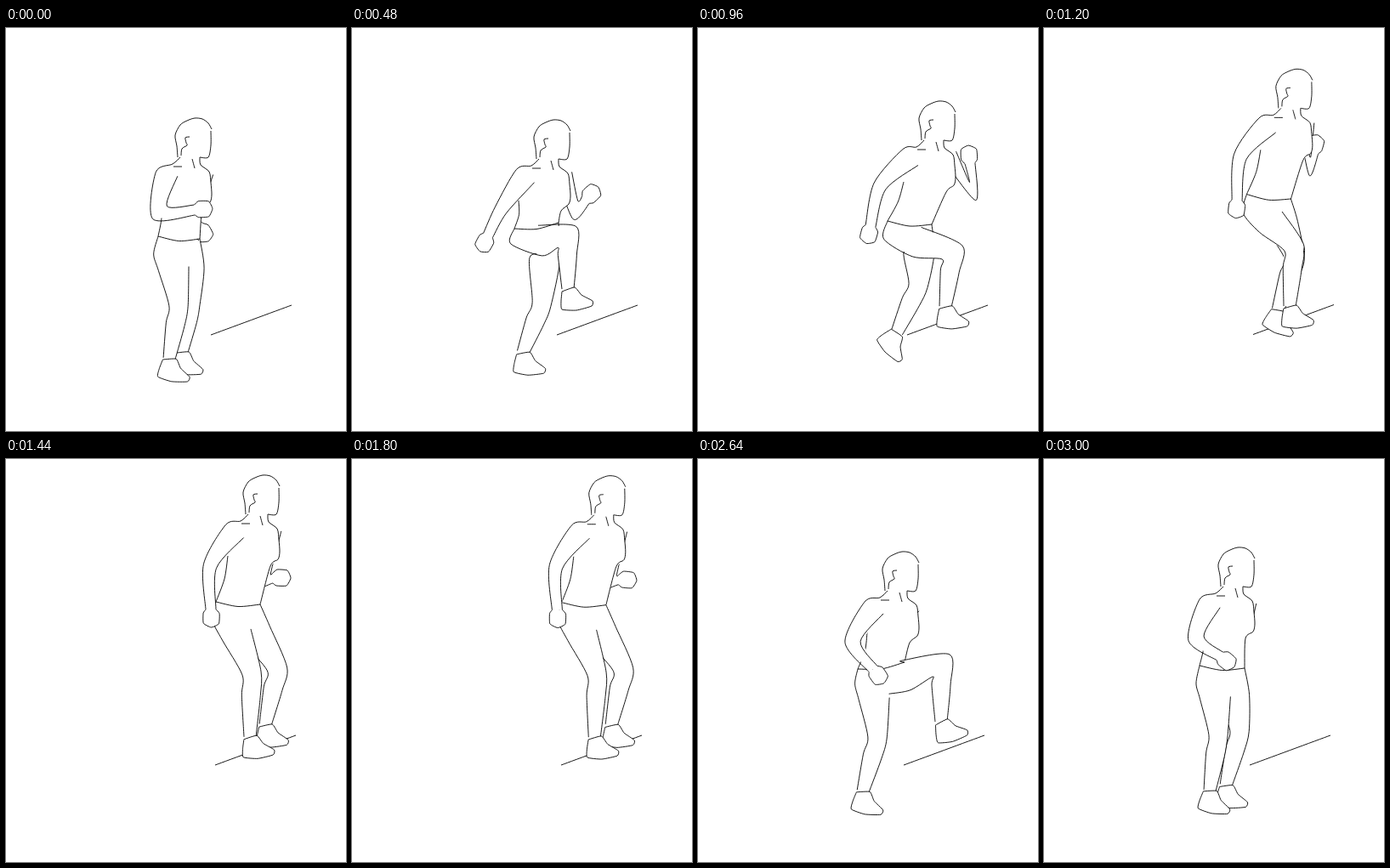
Write an HTML page with a canvas that moves like this. It is 400 px wide and 474 px high and loops after 3.12 s.

```html
<!DOCTYPE html>
<html lang="en">
<head>
<meta charset="utf-8">
<title>Step-up exercise</title>
<style>
html, body { margin: 0; width: 400px; height: 474px; overflow: hidden; background: #fff; }
canvas { display: block; }
</style>
</head>
<body>
<canvas id="stage" width="400" height="474"></canvas>
<script>
const ctx = document.getElementById('stage').getContext('2d');
const LOOP = 3120, STEP = 120;
// Key times; the upright pose on the step is held between two of them.
const times = [0, 480, 960, 1440, 1760, 2160, 2640, 3000];
const poseAt = [0, 1, 2, 3, 3, 4, 5, 6];
const KEYS = times.length;

const points = text => text.split(', ').map(pair => pair.split(' ').map(Number));

// Joint positions, one per pose.
const joints = {
  head: points('222 106, 237 108, 283 86, 302 19, 288 59, 240 109, 228 104'),
  elbow: points('181 217, 175 214, 214 186, 240 126, 232 169, 182 215, 179 211'),
  wrist: points('222 214, 160 244, 203 233, 241 177, 254 206, 206 247, 207 232'),
  farElbow: points('220 222, 263 214, 323 192, 303 140, 294 186, 235 195, 235 195'),
  farWrist: points('227 233, 275 202, 320 159, 314 140, 311 207, 222 213, 222 211'),
  hipBack: points('179 245, 191 236, 223 227, 247 168, 228 205, 188 247, 183 243'),
  hipFront: points('228 248, 243 229, 275 231, 299 171, 289 206, 243 239, 236 246'),
  knee: points('203 327, 253 246, 299 264, 289 252, 244 297, 211 328, 205 325'),
  ankle: points('192 389, 254 307, 291 328, 287 327, 216 353, 194 391, 195 390'),
  farKnee: points('217 325, 223 325, 259 303, 319 247, 320 260, 286 243, 230 320'),
  farAnkle: points('207 381, 201 382, 234 358, 305 313, 308 325, 286 309, 214 384'),
  // Tilt of the near and the far foot in degrees.
  tilt: points('16 14, 0 9, 6 53, 2 7, 54 5, 17 -8, 17 12'),
  ground: points('241 361, 241 361, 246 361, 246 360, 247 360, 242 360, 242 360')
};

// Strokes that move with the head, measured from the top of the skull.
const headStrokes = [
  '-20 46, -21 33, -23 20, -17 8, -9 3, 0 0, 9 1, 16 6, 20 13',
  '19 15, 19 32, 16 46, 6 46',
  '-6 22, -11 23, -10 29, -9 32, -15 36, -16 44',
  '-3 48, 0 59',
  '-25 57, -15 57'
].map(points);
const chestShape = points('6 46, 7 55, 17 63, 19 76, 20 90, 18 99, 9 107');
const shoeShape = points('-7 3, 8 -2, 16 7, 29 14, 28 20, 10 25, -7 24, -8 14');
const fistShape = points('0 -6, 5 -10, 17 -9, 21 0, 16 9, 4 9, 0 6');

const add = (p, x, y) => [p[0] + x, p[1] + y];
const mix = (p, q, k) => p.map((v, i) => v + (q[i] - v) * k);
const angle = (p, q) => Math.atan2(q[1] - p[1], q[0] - p[0]);
const place = (shape, [x, y], turn = 0) => {
  const c = Math.cos(turn), s = Math.sin(turn);
  return shape.map(([u, v]) => [x + u * c - v * s, y + u * s + v * c]);
};

const wrap = k => (k + KEYS) % KEYS;
const span = k => wrap(k) < KEYS - 1 ? times[wrap(k) + 1] - times[wrap(k)] : LOOP - times[KEYS - 1];

// Monotone cubic interpolation around the loop.
function tween(rows, t) {
  let k = KEYS - 1;
  while (times[k] > t) k--;
  const u = (t - times[k]) / span(k);
  return rows[0].map((_, i) => {
    const value = j => rows[poseAt[wrap(j)]][i];
    const slope = j => (value(j + 1) - value(j)) / span(j);
    const tangent = j => {
      const a = slope(j - 1), b = slope(j);
      return a * b > 0 ? 2 * a * b / (a + b) : 0;
    };
    return value(k) + (value(k + 1) - value(k)) * u * u * (3 - 2 * u)
      + span(k) * u * (1 - u) * (tangent(k) * (1 - u) - tangent(k + 1) * u);
  });
}

// Softly rounded line through the points.
function trace(p, soft = 1 / 7) {
  const at = i => p[Math.max(0, Math.min(p.length - 1, i))];
  const control = (i, k) => add(at(i), k * (at(i + 1)[0] - at(i - 1)[0]), k * (at(i + 1)[1] - at(i - 1)[1]));
  ctx.beginPath();
  ctx.moveTo(...p[0]);
  for (let i = 0; i < p.length - 1; i++) {
    ctx.bezierCurveTo(...control(i, soft), ...control(i + 1, -soft), ...at(i + 1));
  }
}

const line = p => { trace(p); ctx.stroke(); };

function fill(p) {
  ctx.beginPath();
  p.forEach(q => ctx.lineTo(...q));
  ctx.fill();
}

function shape(p) {
  trace(p, 1 / 12);
  ctx.fill();
  ctx.stroke();
}

// One side of a limb: its joints pushed out by their half widths, mitred at bends.
const side = (p, widths, sign) => p.map((q, i) => {
  const before = angle(p[Math.max(0, i - 1)], p[Math.max(1, i)]);
  const after = i < p.length - 1 ? angle(q, p[i + 1]) : before;
  const half = Math.atan2(Math.sin(after - before), Math.cos(after - before)) / 2;
  const out = sign * widths[i] * Math.min(1.5, 1 / Math.cos(half));
  return add(q, -Math.sin(before + half) * out, Math.cos(before + half) * out);
});

function limb(p, widths, startBack = [], startFront = []) {
  const back = [...startBack, ...side(p, widths, 1)];
  const front = [...startFront, ...side(p, widths, -1)];
  fill([...back, ...[...front].reverse()]);
  line(back);
  line(front);
}

const arm = (shoulder, elbow, wrist, width, start) => {
  limb([shoulder, elbow, wrist], [width, 7.5, 6], start);
  shape(place(fistShape, wrist, angle(elbow, wrist)));
};

const leg = (hip, knee, ankle, startBack, startFront) =>
  limb([mix(hip, knee, 0.3), knee, mix(knee, ankle, 0.35), ankle], [18, 11, 11, 7], startBack, startFront);

const foot = (ankle, tilt) => {
  const p = place(shoeShape, ankle, tilt * Math.PI / 180);
  shape([...p, p[0]]);
};

function draw(t) {
  const pose = {};
  for (const name in joints) pose[name] = tween(joints[name], t);
  const { head, hipBack, hipFront, ground, tilt } = pose;
  const hip = add(mix(hipBack, hipFront, 0.32), 0, 18);
  const farHip = add(mix(hipBack, hipFront, 0.72), 0, 18);
  const nape = add(head, -17, 46);

  ctx.fillStyle = '#fff';
  ctx.fillRect(0, 0, 400, 474);
  ctx.strokeStyle = '#000';
  ctx.lineWidth = 0.9;
  ctx.lineJoin = 'round';

  line([ground, add(ground, 95, -35)]);
  arm(add(head, 13, 64), pose.farElbow, pose.farWrist, 9);

  const chest = [...place(chestShape, head), hipFront];
  const armpit = add(head, -41, 95);
  const back = [armpit, add(mix(armpit, hipBack, 0.5), 3, 0), hipBack];
  fill([nape, add(head, -33, 60), ...back, ...[...chest].reverse()]);
  line(chest);
  line(back);

  leg(farHip, pose.farKnee, pose.farAnkle, [add(farHip, -3, 17)], [hipFront]);
  foot(pose.farAnkle, tilt[1]);
  leg(hip, pose.knee, pose.ankle, [hipBack, add(hip, -21, 2)]);
  foot(pose.ankle, tilt[0]);
  line([hipBack, add(mix(hipBack, hipFront, 0.5), 0, 4), hipFront]);

  arm(add(head, -33, 66), pose.elbow, pose.wrist, 13, [nape, add(head, -26, 54)]);
  headStrokes.forEach(stroke => line(place(stroke, head)));
}

function tick() {
  draw(Math.floor(performance.now() % LOOP / STEP) * STEP);
  requestAnimationFrame(tick);
}
tick();
</script>
</body>
</html>
```
